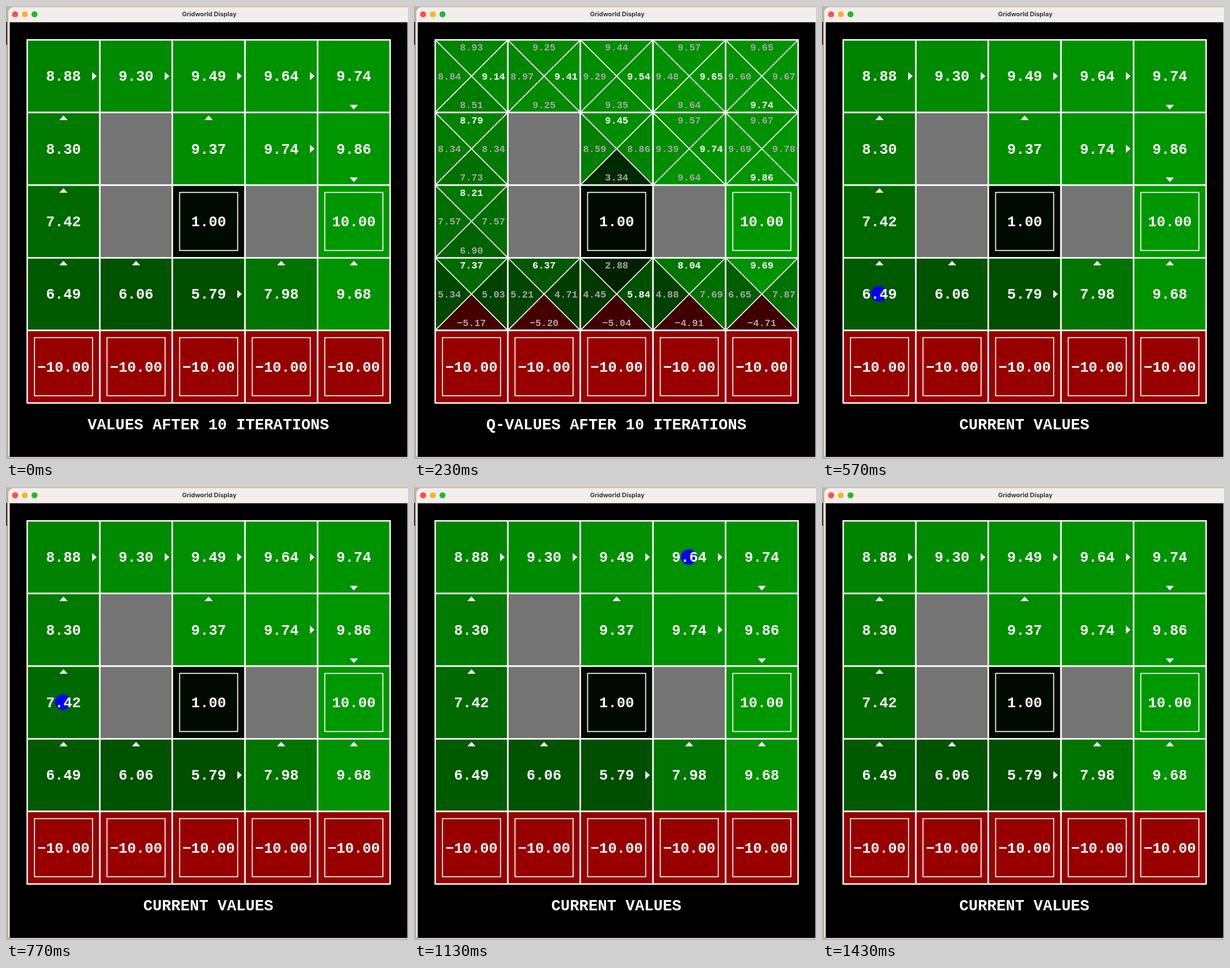
An HTML page with a canvas that plays this animation: 705 px wide and 794 px high, repeating every 1.46 s.

```html
<!DOCTYPE html>
<html lang="en">
<head>
<meta charset="utf-8">
<title>Gridworld Display</title>
<style>
  html, body { margin: 0; width: 100%; height: 100%; overflow: hidden; background: #000; }
  canvas { display: block; }
</style>
</head>
<body>
<canvas id="stage" width="705" height="794"></canvas>
<script>
const ctx = document.getElementById('stage').getContext('2d');
const LOOP = 1460, Q_START = 170, RUN_START = 570, FIRST_MOVE = 770, MOVE_TIME = 72, RUN_END = 1430;
const SIZE = 127.3, HALF = SIZE / 2;

// "." open, "#" wall, letters are exits
const layout = ['.....', '.#...', '.#A#B', '.....', 'CCCCC'];
const exits = { A: 1, B: 10, C: -10 };
const DISCOUNT = 0.9, NOISE = 0.2, LIVING_REWARD = 0.9, ITERATIONS = 10;

const sides = [[0, -1], [1, 0], [0, 1], [-1, 0]]; // north, east, south, west
const cells = layout.flatMap((line, row) => [...line].map((kind, col) =>
  ({ kind, col, row, value: 0, exit: exits[kind] })));

function neighbour(cell, side) {
  const [dx, dy] = sides[side % 4];
  const next = cells.find(c => c.col === cell.col + dx && c.row === cell.row + dy);
  return next && next.kind !== '#' ? next : cell;
}

function qValues(cell) {
  return sides.map((_, side) => {
    const ahead = neighbour(cell, side).value;
    const slips = neighbour(cell, side + 1).value + neighbour(cell, side + 3).value;
    return LIVING_REWARD + DISCOUNT * ((1 - NOISE) * ahead + NOISE / 2 * slips);
  });
}

// Value iteration, then the greedy policy
for (let i = 0; i < ITERATIONS; i++) {
  const next = cells.map(cell => cell.exit ?? Math.max(...qValues(cell)));
  cells.forEach((cell, j) => cell.value = next[j]);
}
for (const cell of cells) {
  cell.q = qValues(cell);
  cell.best = cell.q.indexOf(Math.max(...cell.q));
}

const path = [cells.find(c => c.col === 0 && c.row === 3)];
while (path.length < cells.length) {
  const last = path[path.length - 1];
  const next = neighbour(last, last.best);
  path.push(next);
  if (next.exit !== undefined) break;
}

function agentAt(t) {
  if (t < RUN_START || t >= RUN_END) return null;
  const step = Math.max(0, 1 + Math.floor((t - FIRST_MOVE) / MOVE_TIME));
  return path[Math.min(step, path.length - 1)];
}

const centerX = cell => 100.8 + cell.col * SIZE;
const centerY = cell => 123 + cell.row * SIZE;
const format = v => v.toFixed(2).replace('-', '\u2212');

function valueColor(v) {
  const level = Math.round(255 * Math.pow(Math.abs(v) * 0.065, 1.2));
  return v < 0 ? `rgb(${level},0,0)` : `rgb(0,${level},0)`;
}

function rect(x, y, w, h, color) {
  ctx.fillStyle = color;
  ctx.fillRect(x, y, w, h);
}

function circle(x, y, r, color) {
  ctx.fillStyle = color;
  ctx.beginPath();
  ctx.arc(x, y, r, 0, Math.PI * 2);
  ctx.fill();
}

// Triangle on one side of a cell: tip and base are distances from the centre.
function wedge(x, y, side, tip, base, halfWidth, color) {
  ctx.save();
  ctx.translate(x, y);
  ctx.rotate(side * Math.PI / 2);
  ctx.fillStyle = color;
  ctx.beginPath();
  ctx.moveTo(0, -tip);
  ctx.lineTo(halfWidth, -base);
  ctx.lineTo(-halfWidth, -base);
  ctx.closePath();
  ctx.fill();
  ctx.restore();
}

function mono(text, x, y, size, color = '#fff') {
  ctx.font = `bold ${size}px "Liberation Mono", "Courier New", monospace`;
  ctx.fillStyle = color;
  ctx.fillText(text, x, y + size * 0.33);
}

function outline(x, y, half, width) {
  ctx.lineWidth = width;
  ctx.strokeRect(x - half, y - half, half * 2, half * 2);
}

function drawQCell(cell, x, y) {
  cell.q.forEach((v, side) => wedge(x, y, side, 0, HALF, HALF, valueColor(v)));
  ctx.lineWidth = 1.7;
  ctx.beginPath();
  for (const d of [-HALF, HALF]) {
    ctx.moveTo(x - HALF, y - d);
    ctx.lineTo(x + HALF, y + d);
  }
  ctx.stroke();
  cell.q.forEach((v, side) => {
    const [dx, dy] = sides[side];
    mono(format(v), x + dx * 38.6, y + dy * 50.4, 16.97, side === cell.best ? '#fff' : '#a6a6a6');
  });
}

function drawCell(cell, showQ, agent) {
  const x = centerX(cell), y = centerY(cell), isExit = cell.exit !== undefined;
  if (showQ && cell.kind === '.') return drawQCell(cell, x, y);

  const wall = cell.kind === '#';
  rect(x - HALF, y - HALF, SIZE, SIZE, wall ? '#747474' : valueColor(cell.value));
  if (wall) return;
  if (isExit) outline(x, y, 0.4 * SIZE, 1.7);
  else wedge(x, y, cell.best, 0.457 * SIZE, 0.395 * SIZE, 0.057 * SIZE, '#fff');
  if (cell === agent) circle(x - 0.8, y - 0.3, 13.8, '#0000f5');
  mono(format(cell.value), x, y, 25.46);
}

function drawWindow() {
  rect(0, 0, 705, 794, '#b9b3a4');
  rect(0, 0, 705, 2, '#cbbab2');
  rect(0, 28, 2, 40, '#3a3020');
  ctx.fillStyle = '#f3eeec';
  ctx.beginPath();
  ctx.roundRect(4, 2, 710, 790, [9, 0, 0, 6]);
  ctx.fill();
  rect(6.5, 28.5, 697.5, 762, '#000');
  ['#ff5045', '#fdb02b', '#1fba32'].forEach((color, i) => circle(16 + 17 * i, 14.5, 5.3, color));
  ctx.font = 'bold 11px Inter, sans-serif';
  ctx.fillStyle = '#3a3634';
  ctx.fillText('Gridworld Display', 356.5, 18);
}

function render(t) {
  const showQ = t >= Q_START && t < RUN_START;
  const agent = agentAt(t);
  const caption = t >= RUN_START ? 'CURRENT VALUES'
    : `${showQ ? 'Q-VALUES' : 'VALUES'} AFTER ${ITERATIONS} ITERATIONS`;

  ctx.textAlign = 'center';
  ctx.strokeStyle = '#fff';
  drawWindow();
  for (const cell of cells) drawCell(cell, showQ, agent);
  for (const cell of cells) outline(centerX(cell), centerY(cell), HALF, 2.5);
  mono(caption, 354.8, 733.5, 27.16);
}

function tick() {
  render(performance.now() % LOOP);
  requestAnimationFrame(tick);
}
tick();
</script>
</body>
</html>
```
